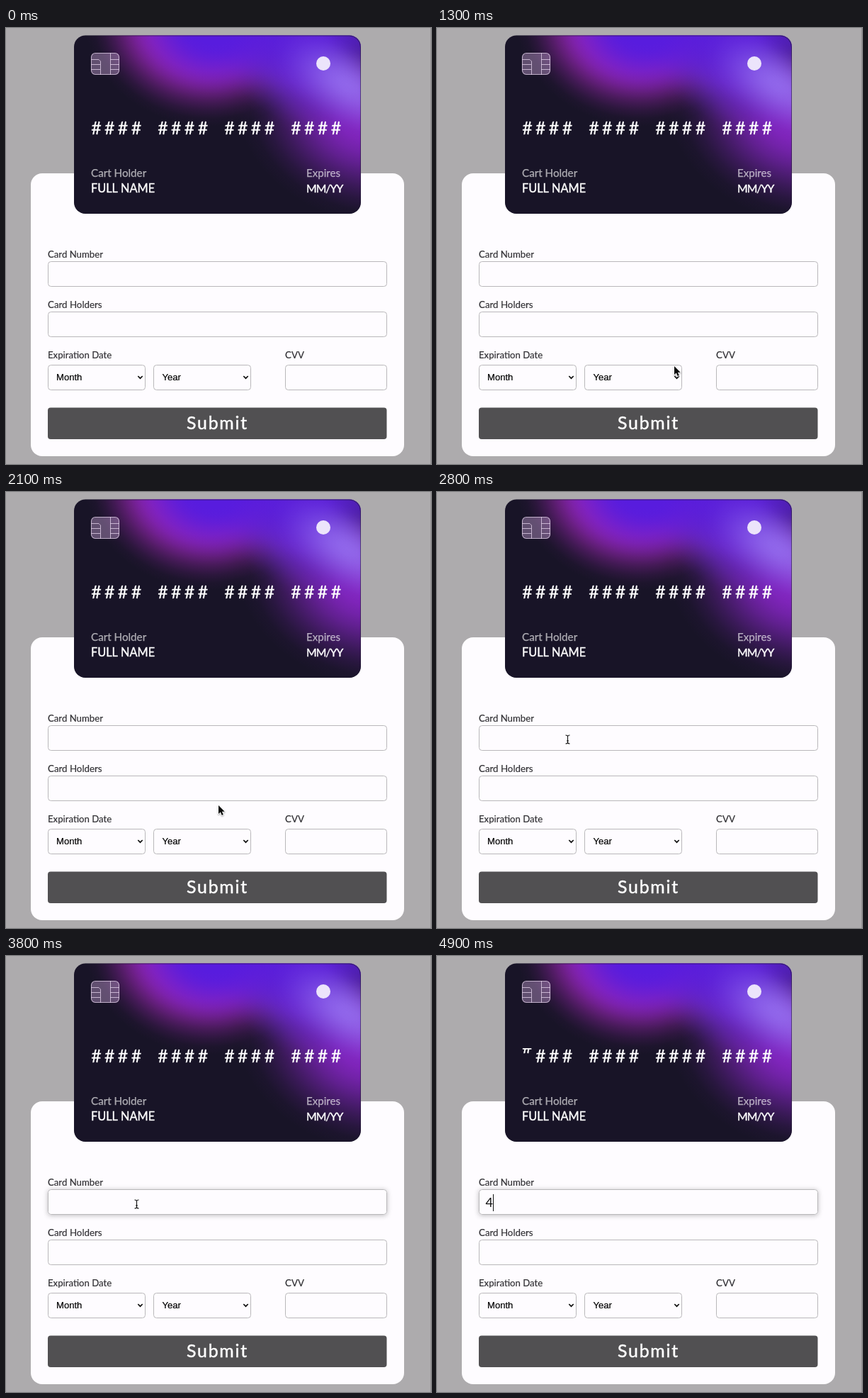
An HTML page with a canvas for the animation above (5 s loop, 600 px wide and 615 px high).

```html
<!DOCTYPE html>
<html lang="en">
<head>
<meta charset="utf-8">
<title>Card form</title>
<style>
  html, body { margin: 0; width: 100%; height: 100%; overflow: hidden; background: #adabad; }
  canvas { display: block; width: 600px; height: 615px; }
</style>
</head>
<body>
<canvas id="stage"></canvas>
<script>
const W = 600, H = 615, LOOP = 5000, STEP = 100;
const LATO = 'Lato, "Open Sans", sans-serif';
const ARIAL = '"Liberation Sans", Arial, sans-serif';
const FOCUS_AT = 3050, TYPE_AT = 4700;

// Pointer stops: time, x, y
const PATH = [
  [1100, 350, 505], [1300, 335, 477], [2100, 300, 442],
  [2800, 184, 349], [3300, 184, 350]
];

const canvas = document.getElementById('stage');
const scale = window.devicePixelRatio || 1;
canvas.width = W * scale;
canvas.height = H * scale;
const ctx = canvas.getContext('2d');

const clamp = v => Math.max(0, Math.min(1, v));
const smooth = k => k * k * (3 - 2 * k);

function box(x, y, w, h, r) {
  ctx.beginPath();
  ctx.roundRect(x, y, w, h, r);
}

function fillBox(x, y, w, h, r, color) {
  box(x, y, w, h, r);
  ctx.fillStyle = color;
  ctx.fill();
}

function line(points, color, width) {
  ctx.beginPath();
  points.forEach(([x, y], i) => i ? ctx.lineTo(x, y) : ctx.moveTo(x, y));
  ctx.strokeStyle = color;
  ctx.lineWidth = width;
  ctx.stroke();
}

// "weight" thickens the strokes a little
function text(str, x, y, size, color, { font = LATO, weight = 0, spacing = 0, align = 'left' } = {}) {
  ctx.font = `${size}px ${font}`;
  ctx.letterSpacing = spacing + 'px';
  ctx.textAlign = align;
  ctx.fillStyle = color;
  ctx.fillText(str, x, y);
  if (weight) {
    ctx.lineWidth = weight;
    ctx.strokeStyle = color;
    ctx.strokeText(str, x, y);
  }
}

// Soft elliptical light; solid out to "core", then fading away
function glow(x, y, rx, ry, angle, rgb, alpha, core) {
  ctx.save();
  ctx.translate(x, y);
  ctx.rotate(angle);
  ctx.scale(rx, ry);
  const g = ctx.createRadialGradient(0, 0, 0, 0, 0, 1);
  for (let i = 0; i <= 8; i++) {
    const k = i / 8;
    g.addColorStop(core + (1 - core) * k, `rgba(${rgb},${alpha * (1 - smooth(k))})`);
  }
  ctx.fillStyle = g;
  ctx.fillRect(-1, -1, 2, 2);
  ctx.restore();
}

function chip() {
  const edge = 'rgba(224,206,232,0.8)';
  fillBox(120.5, 35.5, 39, 30, 5.5, 'rgba(196,160,210,0.42)');
  ctx.strokeStyle = edge;
  ctx.lineWidth = 1.1;
  ctx.stroke();
  [
    [[120, 44.5], [131, 44.5], [133.5, 47], [133.5, 66]],
    [[147.5, 35], [147.5, 66]],
    [[120, 51.5], [133, 51.5]],
    [[120, 58.5], [133, 58.5]],
    [[147, 44.5], [160, 44.5]],
    [[147, 51.5], [160, 51.5]],
    [[147, 58.5], [160, 58.5]]
  ].forEach(p => line(p, edge, 1));
}

function digits(t) {
  const lift = t < TYPE_AT ? 0 : 13 * Math.pow((t - 4650) / 250, 1.5);
  for (let i = 0; i < 16; i++) {
    const x = 127.5 + Math.floor(i / 4) * 94 + (i % 4) * 18.8;
    ctx.save();
    if (i === 0) {
      ctx.beginPath();
      ctx.rect(x - 10, 130, 20, 30);
      ctx.clip();
    }
    text('#', x, 150 - (i ? 0 : lift), 25, '#fff', { align: 'center', weight: 0.3 });
    ctx.restore();
  }
}

function card(t) {
  ctx.save();
  box(96, 10.5, 405, 251.5, 16);
  ctx.clip();
  ctx.fillStyle = '#181427';
  ctx.fillRect(96, 10, 405, 253);
  glow(505, 130, 185, 142, 0.35, '136,38,200', 0.95, 0.08);
  glow(280, -8, 170, 146, 0.16, '156,38,180', 1, 0.4);
  glow(415, 62, 135, 82, 0.5, '108,42,206', 0.95, 0.1);
  glow(410, 0, 150, 98, 0.25, '92,32,216', 1, 0.25);
  glow(292, -4, 132, 106, 0.1, '88,28,222', 1, 0.25);
  glow(482, 80, 120, 62, 0.55, '154,118,246', 0.8, 0);
  glow(505, 8, 70, 42, 0.3, '88,32,206', 0.6, 0.1);
  box(96.5, 11, 404, 250.5, 16);
  ctx.strokeStyle = 'rgba(28,22,44,0.55)';
  ctx.lineWidth = 1;
  ctx.stroke();
  ctx.restore();

  chip();
  ctx.beginPath();
  ctx.arc(448, 50, 10, 0, Math.PI * 2);
  ctx.fillStyle = '#ece4fb';
  ctx.fill();

  digits(t);
  const faint = 'rgba(255,255,255,0.62)';
  text('Cart Holder', 120, 210, 15.2, faint, { weight: 0.25 });
  text('Expires', 424, 210, 15.1, faint, { weight: 0.25 });
  text('FULL NAME', 120, 232, 16.3, '#fff', { weight: 0.4 });
  text('MM/YY', 424, 232, 15.8, '#fff', { weight: 0.4, spacing: -1 });
}

function field(x, y, w, focus = 0) {
  ctx.save();
  if (focus) {
    ctx.shadowColor = `rgba(0,0,0,${0.26 * focus})`;
    ctx.shadowBlur = 7 * scale;
    ctx.shadowOffsetY = scale;
  }
  fillBox(x, y, w, 36, 4, '#fefcff');
  ctx.restore();
  box(x + 0.5, y + 0.5, w - 1, 35, 4);
  ctx.strokeStyle = '#b9b8ba';
  ctx.lineWidth = 1;
  ctx.stroke();
}

function select(label, x, textX) {
  field(x, 475, 138);
  text(label, textX, 497, 13.1, '#000', { font: ARIAL, weight: 0.2 });
  const cx = x + 130.5;
  line([[cx - 3.2, 491], [cx, 494.2], [cx + 3.2, 491]], '#111', 1.7);
}

function form(t) {
  const ink = '#333236';
  fillBox(35, 205, 527, 399, 16, '#fefcff');
  text('Card Number', 59, 324, 13.2, ink, { weight: 0.2 });
  text('Card Holders', 59, 395, 13.3, ink, { weight: 0.2 });
  text('Expiration Date', 59, 466, 13.2, ink, { weight: 0.2 });
  text('CVV', 394, 466, 13.3, ink, { weight: 0.2 });

  field(59, 329, 479, clamp((t - FOCUS_AT + 50) / 200));
  field(59, 400, 479);
  select('Month', 59, 71);
  select('Year', 208, 220.5);
  field(394, 475, 144);

  const typed = t >= TYPE_AT;
  if (typed) text('4', 68.5, 353.5, 18, '#111');
  const blinkOn = Math.floor((t - FOCUS_AT) / 500) % 2 === 0;
  if (typed || (t >= FOCUS_AT && blinkOn)) {
    ctx.fillStyle = '#111';
    ctx.fillRect(typed ? 79 : 68, 336, 1, 24);
  }

  fillBox(59, 535.5, 478.5, 44.5, 4, '#515052');
  text('Submit', 255, 566, 24.8, '#fff', { weight: 0.5, spacing: 1.8 });
}

function arrow(x, y) {
  ctx.save();
  ctx.translate(x, y);
  ctx.beginPath();
  ctx.moveTo(0, 0);
  [[0, 12], [2.8, 9.4], [4.8, 14], [6.8, 13.1], [4.9, 8.7], [8.7, 8.7]]
    .forEach(([px, py]) => ctx.lineTo(px, py));
  ctx.closePath();
  ctx.lineJoin = 'round';
  ctx.strokeStyle = '#fff';
  ctx.lineWidth = 1.8;
  ctx.shadowColor = 'rgba(0,0,0,0.35)';
  ctx.shadowBlur = 2 * scale;
  ctx.shadowOffsetY = scale;
  ctx.stroke();
  ctx.shadowColor = 'transparent';
  ctx.fillStyle = '#0a0a0a';
  ctx.fill();
  ctx.restore();
}

function beam(x, y) {
  ctx.save();
  ctx.translate(x + 0.5, y);
  ctx.beginPath();
  for (const s of [-1, 1]) {
    ctx.moveTo(-3, 6 * s);
    ctx.quadraticCurveTo(0, 6 * s, 0, 4 * s);
    ctx.quadraticCurveTo(0, 6 * s, 3, 6 * s);
  }
  ctx.moveTo(0, -5);
  ctx.lineTo(0, 5);
  ctx.moveTo(-1.5, 2);
  ctx.lineTo(1.5, 2);
  ctx.strokeStyle = '#111';
  ctx.lineWidth = 1.1;
  ctx.stroke();
  ctx.restore();
}

function pointer(t) {
  if (t < PATH[0][0] || t >= TYPE_AT) return;
  let [, x, y] = PATH[PATH.length - 1];
  for (let i = 1; i < PATH.length; i++) {
    const [t0, x0, y0] = PATH[i - 1], [t1, x1, y1] = PATH[i];
    if (t <= t1) {
      const k = smooth((t - t0) / (t1 - t0));
      x = x0 + (x1 - x0) * k;
      y = y0 + (y1 - y0) * k;
      break;
    }
  }
  const overInput = (y > 329 && y < 365) || (y > 400 && y < 436);
  (overInput ? beam : arrow)(x, y);
}

function draw(t) {
  ctx.setTransform(scale, 0, 0, scale, 0, 0);
  ctx.fillStyle = '#adabad';
  ctx.fillRect(0, 0, W, H);
  ctx.fillStyle = '#969496';
  ctx.fillRect(W - 1, 0, 1, H);
  form(t);
  card(t);
  pointer(t);
}

const start = performance.now();
function tick() {
  const t = (performance.now() - start) % LOOP;
  draw(Math.floor(t / STEP) * STEP);
  requestAnimationFrame(tick);
}
tick();
</script>
</body>
</html>
```
